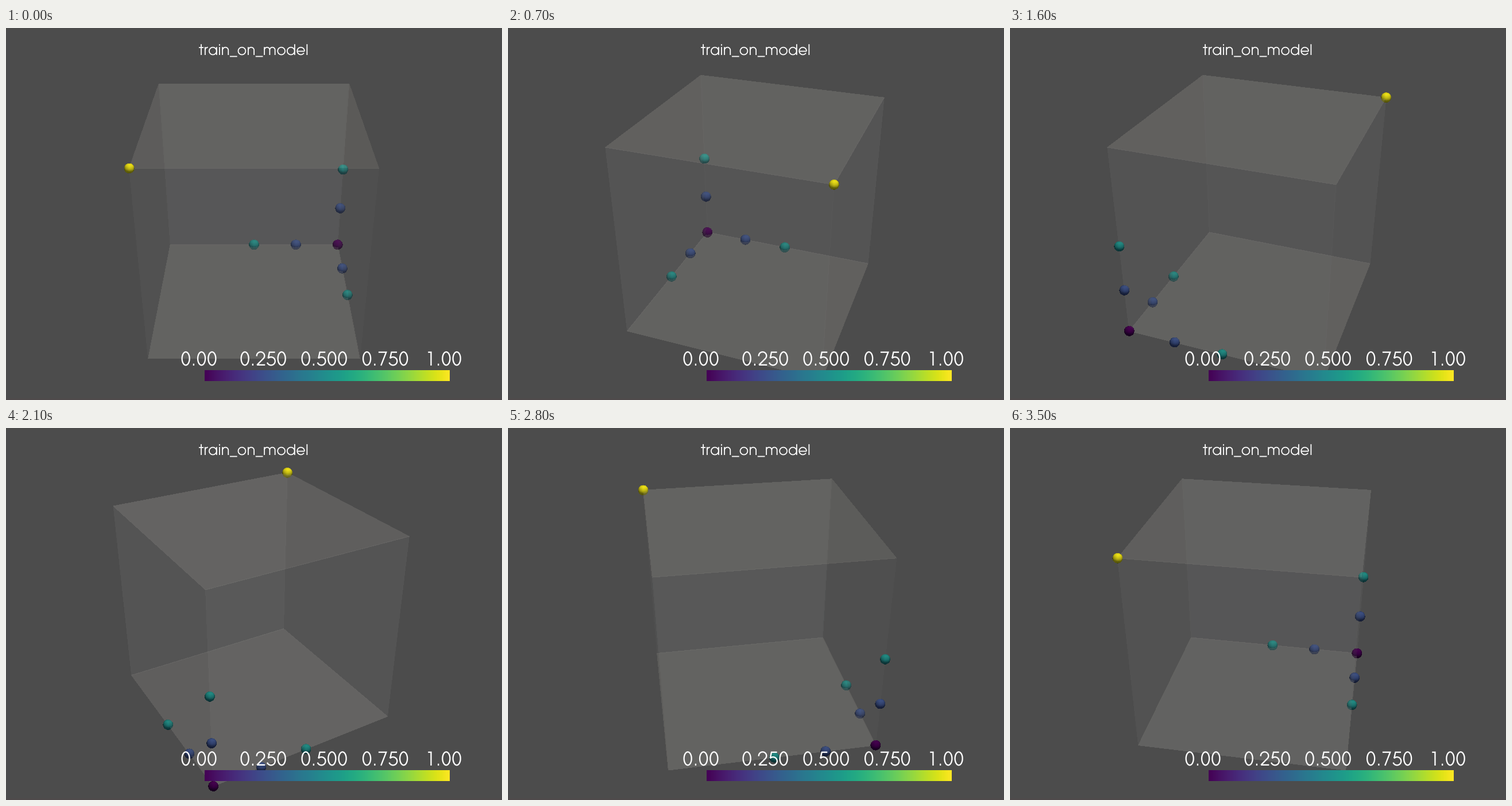
A matplotlib script for the animation above (3600 ms loop, 864 by 648 pixels).

```python
import numpy as np
import matplotlib.pyplot as plt
from matplotlib.animation import FuncAnimation
from matplotlib.collections import LineCollection
from matplotlib.patches import Polygon, Rectangle

W, H, FRAMES = 864, 648, 36
FOCAL = H / 2 / np.tan(np.radians(15))  # 30 degree view angle
RADIUS = 8.9                            # sphere radius in pixels
OPACITY = 0.13
GLOW = 1.08                             # extra brightness of the spheres
BG = "#4c4c4c"
CENTER = np.full(3, 0.5)
viridis = plt.get_cmap("viridis")

# Points on the three axes, plus the far corner; the value is the largest coordinate.
points = [np.zeros(3)]
points += [v * axis for axis in np.eye(3) for v in (0.25, 0.5)]
points.append(np.ones(3))


# ---- lighting -------------------------------------------------------------
def light(elevation, azimuth, power, color):
    e, a = np.radians([elevation, azimuth])
    direction = np.array([np.sin(a) * np.cos(e), np.sin(e), np.cos(a) * np.cos(e)])
    return direction, power * np.array(color)


LIGHTS = [
    light(50, 10, 0.75, (1, 0.972, 0.902)),
    light(-75, 0, 0.25, (0.908, 0.933, 1)),
    light(0, 0, 0.25, (1, 1, 1)),
    light(0, 110, 0.75 / 3.5, (1, 1, 1)),
    light(0, -110, 0.75 / 3.5, (1, 1, 1)),
]


def shade(normal):
    """Diffuse light on normals given in camera space (last axis xyz)."""
    total = sum(np.maximum(normal @ d, 0)[..., None] * c for d, c in LIGHTS)
    return np.clip(total, 0, 1)


# ---- camera ---------------------------------------------------------------
def camera(k):
    """Eye position and view rows (right, up, back) on the orbit."""
    a = np.pi / 2 - 2 * np.pi * k / FRAMES
    c, s = np.cos(a), np.sin(a)
    eye = CENTER + np.array([3 * c, 3 * s, np.sqrt(3)])
    back = (eye - CENTER) / np.linalg.norm(eye - CENTER)
    right = np.array([-s, c, 0])
    return eye, np.array([right, np.cross(back, right), back])


def project(p, eye, view):
    q = (np.asarray(p) - eye) @ view.T
    depth = -q[..., 2]
    return W / 2 + FOCAL * q[..., 0] / depth, H / 2 - FOCAL * q[..., 1] / depth, depth


# ---- box ------------------------------------------------------------------
FACES = [(axis, side) for axis in range(3) for side in (0, 1)]


def corners(axis, side):
    quad = np.array([(0, 0), (1, 0), (1, 1), (0, 1)], float)
    return np.insert(quad, axis, side, axis=1)


def face_color(axis, side, eye, view):
    normal = np.zeros(3)
    normal[axis] = 1 if eye[axis] > side else -1
    return shade(view @ normal)


# ---- spheres --------------------------------------------------------------
SIZE = 22


def sphere_patch(x, y, depth, base, eye, view, colors):
    """RGBA tile of one lit sphere, veiled by the box faces in front of it."""
    x0, y0 = int(x) - SIZE // 2, int(y) - SIZE // 2
    py, px = np.mgrid[0:SIZE, 0:SIZE] + 0.5
    px, py = px + x0, py + y0
    nx, ny = (px - x) / RADIUS, (y - py) / RADIUS
    rr = np.hypot(nx, ny)
    nz = np.sqrt(np.maximum(1 - rr**2, 0))
    rgb = np.clip(GLOW * base * shade(np.stack([nx, ny, nz], -1)), 0, 1)

    near = depth * (1 - nz * RADIUS / FOCAL)
    ray = np.stack([(px - W / 2) / FOCAL, (H / 2 - py) / FOCAL, -np.ones_like(px)], -1) @ view
    for (axis, side), color in zip(FACES, colors):
        with np.errstate(all="ignore"):
            t = (side - eye[axis]) / ray[..., axis]
            hit = np.delete(eye + ray * t[..., None], axis, axis=-1)
            front = (t > 0) & (t < near) & np.all((hit >= 0) & (hit <= 1), axis=-1)
        rgb[front] += OPACITY * (color - rgb[front])

    return np.dstack([rgb, rr <= 1]), (x0, x0 + SIZE, y0 + SIZE, y0)


# ---- geometric lettering, 1000 units per em -------------------------------
def arc(cx, cy, rx, start=0, end=360, ry=None):
    a = np.radians(np.linspace(start, end, 49))
    return list(zip(cx + rx * np.cos(a), cy + (ry or rx) * np.sin(a)))


def stem(x, top, bottom=0):
    return [(x, bottom), (x, top)]


def arch(cx, r):
    return arc(cx, 525 - r, r, 180, 0) + [(cx + r, 0)]


# character: (advance, strokes)
GLYPHS = {
    "a": (683, [arc(329, 273, 252), stem(586, 547)]),
    "d": (685, [arc(329, 273, 252), stem(588, 740)]),
    "e": (650, [[(75, 255), (575, 255)], arc(325, 273, 250, -4, 327)]),
    "i": (200, [stem(100, 547), stem(100, 740, 640)]),
    "l": (200, [stem(100, 740)]),
    "m": (938, [stem(105, 547), arch(287, 182), arch(651, 182)]),
    "n": (610, [stem(105, 547), arch(305, 200)]),
    "o": (655, [arc(327, 273, 252)]),
    "r": (301, [stem(98, 547), arc(290, 333, 192, 180, 90)]),
    "t": (339, [stem(169, 740), [(10, 512), (330, 512)]]),
    "_": (500, [[(0, -100), (500, -100)]]),
    ".": (277, [stem(139, 100)]),
    "0": (554, [arc(277, 370, 198, ry=348)]),
    "1": (554, [[(150, 705), (307, 705), (307, 0)]]),
    "2": (554, [arc(275, 513, 205, 185, -45) + [(87, 35), (510, 35)]]),
    "5": (554, [[(480, 705), (190, 705)] + arc(272, 235, 215, 135, -160)]),
    "7": (554, [[(60, 705), (465, 705), (190, 0)]]),
}


def write(text, x, baseline, size):
    s, lines = size / 1000, []
    for ch in text:
        advance, strokes = GLYPHS[ch]
        lines += [[(x + u * s, baseline - v * s) for u, v in st] for st in strokes]
        x += advance * s
    ax.add_collection(LineCollection(lines, colors="white", linewidths=70 * s, capstyle="butt",
                                     joinstyle="miter", snap=False, zorder=6), autolim=False)


# ---- stage ----------------------------------------------------------------
fig = plt.figure(figsize=(W / 72, H / 72), dpi=72, facecolor=BG)
ax = fig.add_axes([0, 0, 1, 1])
ax.axis("off")

ax.add_patch(Rectangle((0, 645), W, 3, color="#4f4a4b", lw=0, zorder=0))
quads = [ax.add_patch(Polygon(np.zeros((4, 2)), lw=0, alpha=OPACITY, antialiased=False,
                              snap=False, zorder=1)) for _ in FACES]
balls = [ax.imshow(np.zeros((SIZE, SIZE, 4)), extent=(0, SIZE, SIZE, 0), aspect="auto",
                   interpolation="nearest") for _ in points]
ax.imshow(np.linspace(0, 1, 256)[None], cmap=viridis, extent=(346, 773, 615, 596),
          aspect="auto", interpolation="nearest", zorder=5)
ax.set(xlim=(0, W), ylim=(H, 0))

write("train_on_model", 335.75, 47, 25.4)
for label, x in [("0.00", 304), ("0.250", 407), ("0.500", 513),
                 ("0.750", 619.5), ("1.00", 730.3)]:
    write(label, x, 588, 33)


def draw(k):
    eye, view = camera(k)
    colors = [face_color(*face, eye, view) for face in FACES]
    for quad, face, color in zip(quads, FACES, colors):
        x, y, _ = project(corners(*face), eye, view)
        quad.set_xy(np.column_stack([x, y]))
        quad.set_facecolor(color)
    for ball, p in zip(balls, points):
        x, y, depth = project(p, eye, view)
        base = np.array(viridis(0.97 * p.max())[:3])
        tile, extent = sphere_patch(x, y, depth, base, eye, view, colors)
        ball.set_data(tile)
        ball.set_extent(extent)
        ball.set_zorder(3 - depth / 10)
    return quads + balls


anim = FuncAnimation(fig, draw, frames=FRAMES, interval=100, repeat=True, repeat_delay=0)
plt.show()
```
